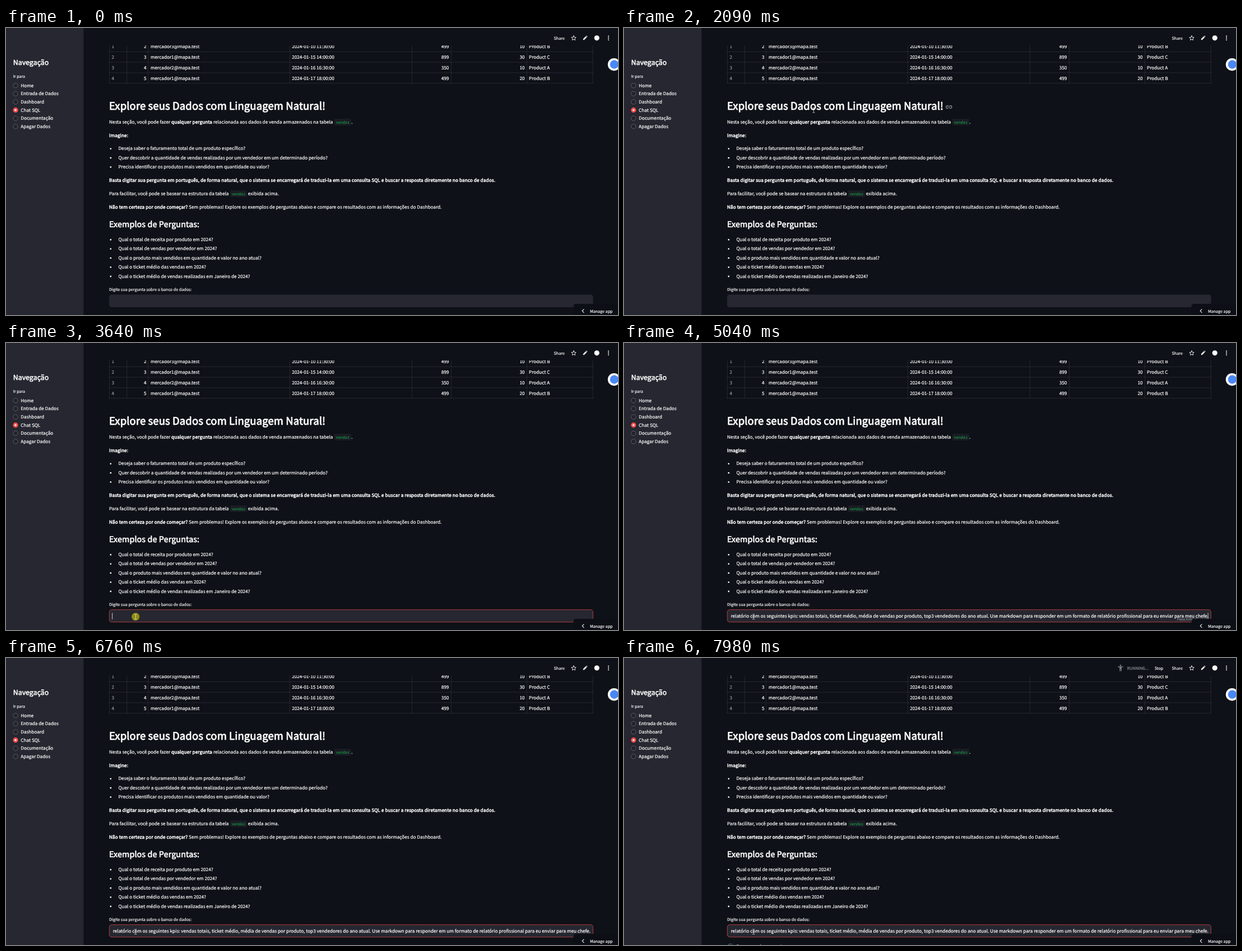
An HTML page for the animation above (8000 ms loop, 1092x513 px).

```html
<!DOCTYPE html>
<html lang="pt-BR">
<head>
<meta charset="utf-8">
<title>Chat SQL</title>
<style>
  html, body { margin: 0; width: 100%; height: 100%; overflow: hidden; background: #0e1117; }
  svg { display: block; width: 1092px; height: 513px; }
  text {
    font-family: 'Noto Sans CJK JP', 'Noto Sans CJK SC', 'Noto Sans CJK', 'Noto Sans CJK KR', 'Open Sans', sans-serif;
    color: #fff; fill: currentColor; stroke: currentColor; stroke-width: .025em; stroke-linejoin: round;
    text-rendering: geometricPrecision; white-space: pre;
  }
  .b { stroke-width: .06em; letter-spacing: .0127em; }
  .h { stroke-width: .045em; letter-spacing: .0071em; }
  .dim { color: #94969c; }
  .code { font-family: 'Noto Sans Mono', 'DejaVu Sans Mono', monospace; color: #179443; }
  .end { text-anchor: end; }
  .line { fill: none; stroke: #fafafa; stroke-linecap: round; stroke-linejoin: round; }
</style>
</head>
<body>
<svg id="stage" viewBox="0 0 1092 513" xmlns="http://www.w3.org/2000/svg"></svg>
<script>
const LOOP = 8000;
const ZOOM = 0.5676;          // page zoom
const EM = ZOOM / 1.108;      // page pixels to font size

const text = (x, y, s, size = 16, cls = '') =>
  `<text x="${x}" y="${y}" class="${cls}" font-size="${(size * EM).toFixed(3)}">${s}</text>`;
const rect = (x, y, w, h, fill, extra = '') =>
  `<rect x="${x}" y="${y}" width="${w}" height="${h}" fill="${fill}" ${extra}/>`;
const dot = (x, y, r, fill, extra = '') =>
  `<circle cx="${x}" cy="${y}" r="${r}" fill="${fill}" ${extra}/>`;
const path = (d, width, extra = '') =>
  `<path class="line" d="${d}" stroke-width="${width}" ${extra}/>`;
const bold = s => `<tspan class="b">${s}</tspan>`;

function sidebar() {
  const pages = ['Home', 'Entrada de Dados', 'Dashboard', 'Chat SQL', 'Documentação', 'Apagar Dados'];
  const items = pages.map((name, i) => {
    const y = 102.8 + 14.64 * i;
    const mark = i === 3
      ? dot(17, y, 4.6, '#ff4b4b') + dot(17, y, 1.7, '#fff')
      : dot(17, y, 4.2, '#22232b', 'stroke="#6a6b72" stroke-width=".8"');
    return mark + text(26.3, y + 3, name);
  });
  return rect(0, 0, 138.4, 513, '#262730') +
    text(12.7, 66, 'Navegação', 24, 'b h') + text(12.7, 88.6, 'Ir para', 14) + items.join('');
}

function table() {
  const rows = [
    [3, '10 11:30', 499, 10, 'B'], [1, '15 14:00', 899, 30, 'C'],
    [2, '16 16:30', 350, 10, 'A'], [1, '17 18:00', 499, 20, 'B']
  ];
  let out = '';
  rows.forEach(([who, when, value, amount, product], i) => {
    const y = 36 + 18.87 * i, ruleY = 42.3 + 18.8 * i;
    out += path(`M184 ${ruleY}H1047.5`, .6, 'stroke-opacity=".16"') +
      text(188.6, y, i + 1, 16, 'dim') +
      text(250.6, y, i + 2, 16, 'end') +
      text(258, y, `mercador${who}@mapa.test`) +
      text(510.2, y, `2024-01-${when}:00`) +
      text(790.3, y, value, 16, 'end') +
      text(925.6, y, amount, 16, 'end') +
      text(933, y, 'Product ' + product);
  });
  for (const x of [184.4, 215.6, 253.7, 506.4, 724.2, 794.3, 929.3, 1047.2])
    out += path(`M${x} 31V98.7`, .6, 'stroke-opacity=".16"');
  return `<g clip-path="url(#tableArea)">${out}</g>`;
}

const bullets = (y, items) => items.map((s, i) =>
  dot(186.8, y + 16.4 * i - 2.6, 1.4, '#fafafa') + text(200.4, y + 16.4 * i, s)).join('');

const code = (x, y) =>
  rect(x, y - 8.8, 30.6, 12, '#1a1c24', 'rx="2.3"') +
  text(x + 3, y - .2, 'vendas', 12 * ZOOM / EM, 'code');

function article() {
  return text(184, 146, 'Explore seus Dados com Linguagem Natural!', 36, 'b h') +
    text(184, 171, `Nesta seção, você pode fazer ${bold('qualquer pergunta')} relacionada aos dados de venda armazenados na tabela`) +
    code(585.5, 171) + text(616.2, 171, '.') +
    text(184, 194.5, 'Imagine:', 16, 'b') +
    bullets(218.4, [
      'Deseja saber o faturamento total de um produto específico?',
      'Quer descobrir a quantidade de vendas realizadas por um vendedor em um determinado período?',
      'Precisa identificar os produtos mais vendidos em quantidade ou valor?']) +
    text(184, 275, 'Basta digitar sua pergunta em português, de forma natural, que o sistema se encarregará de traduzi-la em uma consulta SQL e buscar a resposta diretamente no banco de dados.', 16, 'b') +
    text(184, 299, 'Para facilitar, você pode se basear na estrutura da tabela') +
    code(399.5, 299) + text(431.8, 299, 'exibida acima.') +
    text(184, 322.6, `${bold('Não tem certeza por onde começar?')} Sem problemas! Explore os exemplos de perguntas abaixo e compare os resultados com as informações do Dashboard.`) +
    text(184, 356, 'Exemplos de Perguntas:', 28, 'b h') +
    bullets(381, [
      'Qual o total de receita por produto em 2024?',
      'Qual o total de vendas por vendedor em 2024?',
      'Qual o produto mais vendidos em quantidade e valor no ano atual?',
      'Qual o ticket médio das vendas em 2024?',
      'Qual o ticket médio de vendas realizadas em Janeiro de 2024?']) +
    text(184, 470.2, 'Digite sua pergunta sobre o banco de dados:', 14);
}

function star(cx, cy, r) {
  const pts = Array.from({ length: 10 }, (_, i) => {
    const a = Math.PI * (i / 5 - .5), d = i % 2 ? r * .46 : r;
    return `${(cx + d * Math.cos(a)).toFixed(2)} ${(cy + d * Math.sin(a)).toFixed(2)}`;
  });
  return path(`M${pts.join('L')}Z`, .9);
}

function toolbar() {
  return text(977.6, 20.6, 'Share', 14) + star(1013, 18.2, 4.4) +
    '<path d="M1029.8 21.3v-1.9l4.6-4.6 1.9 1.9-4.6 4.6zM1035 14.2l.8-.8 1.9 1.9-.8.8z" fill="#fafafa"/>' +
    dot(1054.2, 17.8, 4.6, '#fafafa') +
    [14.6, 17.9, 21.2].map(y => dot(1075, y, 1.05, '#fafafa')).join('') +
    dot(1085, 65.2, 11.2, '#fff') + dot(1085.3, 65.2, 7.6, '#4a88f4');
}

function field() {
  return rect(184, 476.4, 863.6, 22.7, '#262730', 'rx="4.5"') +
    rect(184.3, 476.7, 863, 22.1, 'none', 'id="focus" rx="4.4" stroke="#ff4b4b" stroke-opacity=".8" stroke-width=".8"') +
    `<g id="query">${text(190.7, 491.4, 'relatório com os seguintes kpis: vendas totais, ticket médio, média de vendas por produto, top3 vendedores do ano atual. Use markdown para responder em um formato de relatório profissional para eu enviar para meu chefe.')}</g>` +
    `<g id="hint">${text(986.4, 496.2, 'Press Enter to apply', 12, 'dim')}</g>` +
    rect(0, 482.4, .8, 11.4, '#fafafa', 'id="caret"');
}

function status() {
  return `<g id="running"><g id="figure"></g>` +
    text(897.8, 20.6, 'RUNNING...', 14, 'dim') + text(946.8, 20.6, 'Stop', 14) + '</g>' +
    `<g id="spinner">${path('M184.7 516.5a5.4 5.4 0 0 1 10.8 0', 1.4, 'stroke-opacity=".25"')}` +
    path('M186.3 512.6a5.4 5.4 0 0 1 5.6 -1.2', 1.4, 'style="stroke:#3f83b8"') +
    text(200.6, 518, 'Processando pergunta...') + '</g>';
}

const footer =
  '<path d="M1012.6 513V497.5q0-4.6 4.6-4.6H1092V513z" fill="#0c0f15"/>' +
  path('M1031 502.8l-2.9 2.9 2.9 2.9', 1.1) + text(1041.9, 508.6, 'Manage app', 14);

const linkIcon = '<g id="link" opacity=".6">' +
  path('M578.6 138.9h-1.5a2.4 2.4 0 0 0 0 4.8h1.5M581 138.9h1.5a2.4 2.4 0 0 1 0 4.8h-1.5M577.7 141.3h4.2', 1.1) + '</g>';

const pointer =
  dot(0, 0, 7, '#8f8a12', 'id="click"') +
  '<path id="arrow" d="M0 0V8.6L2 6.8 3.4 9.8 4.8 9.2 3.5 6.3H6.2Z" fill="#fff" stroke="#000" stroke-width=".5"/>' +
  path('M-1.8 -4.4H-.5L0 -4 .5 -4.4H1.8M0 -4V4M-1.8 4.4H-.5L0 4 .5 4.4H1.8', .8, 'id="beam" stroke-opacity=".8"');

document.getElementById('stage').innerHTML =
  '<clipPath id="tableArea"><rect x="183" y="31.2" width="866" height="70"/></clipPath>' +
  sidebar() + table() + article() + linkIcon + toolbar() + field() + status() +
  `<g id="pointer">${pointer}</g>` + footer;

const $ = id => document.getElementById(id);
const show = (id, on) => $(id).setAttribute('opacity', +on);
const clamp = v => Math.max(0, Math.min(1, v));
const ramp = (t, a, b) => clamp((t - a) / (b - a));
const within = (t, ...spans) => spans.some(([a, b]) => t >= a && t < b);

// time, x, y
const track = [
  [1000, 560, 1.5], [1400, 349.5, 46.5], [1500, 349.5, 46.5], [1700, 347.5, 45.3], [2000, 347.5, 45.3],
  [2100, 338.5, 146.8], [2900, 240.5, 457.8], [3000, 238.6, 481], [3200, 232.5, 487], [3300, 231.2, 489.3]
];

function pointerAt(t) {
  const q = Math.floor((t + 20) / 100) * 100;
  const i = track.findIndex(p => p[0] > q);
  if (i < 0) return track[track.length - 1].slice(1);
  const [t0, x0, y0] = track[Math.max(0, i - 1)], [t1, x1, y1] = track[i];
  const k = ramp(q, t0, t1), e = k * k * (3 - 2 * k);
  return [x0 + (x1 - x0) * e, y0 + (y1 - y0) * e];
}

function figure(t) {
  const tilt = [1.6, -1.6, 0][Math.floor(Math.max(0, t - 6960) / 200) % 3];
  return dot(886, 13.2, 1.3, '#84868c') +
    `<path d="M881.2 ${15.6 + tilt}L884.6 16H887.4L890.8 ${15.6 + tilt}M884.9 16.4V23.4M887.1 16.4V23.4M886 16V19.6" ` +
    'fill="none" stroke="#84868c" stroke-width="1.3"/>';
}

function draw(t) {
  const [x, y] = pointerAt(t);
  const beam = t >= 2090;
  $('pointer').setAttribute('transform', `translate(${x.toFixed(2)} ${y.toFixed(2)})`);
  show('pointer', t >= 1000);
  show('arrow', !beam);
  show('beam', beam);
  show('click', within(t, [3430, 3730]));
  $('link').setAttribute('opacity', within(t, [2090, 2190]) ? .6 : 0);

  const pasted = t >= 5040;
  show('focus', ramp(t, 3330, 3600));
  show('query', pasted);
  show('hint', within(t, [5040, 6360]));
  $('caret').setAttribute('x', pasted ? 1041.6 : 189.3);
  show('caret', within(t, [3530, 4140], [4640, 5550], [6160, 6760], [7160, 7660]));

  show('running', ramp(t, 6860, 7160));
  $('figure').innerHTML = figure(t);
  $('spinner').setAttribute('opacity', .6 * ramp(t, 7360, 7660));
}

function tick() {
  draw(performance.now() % LOOP);
  requestAnimationFrame(tick);
}
tick();
</script>
</body>
</html>
```
